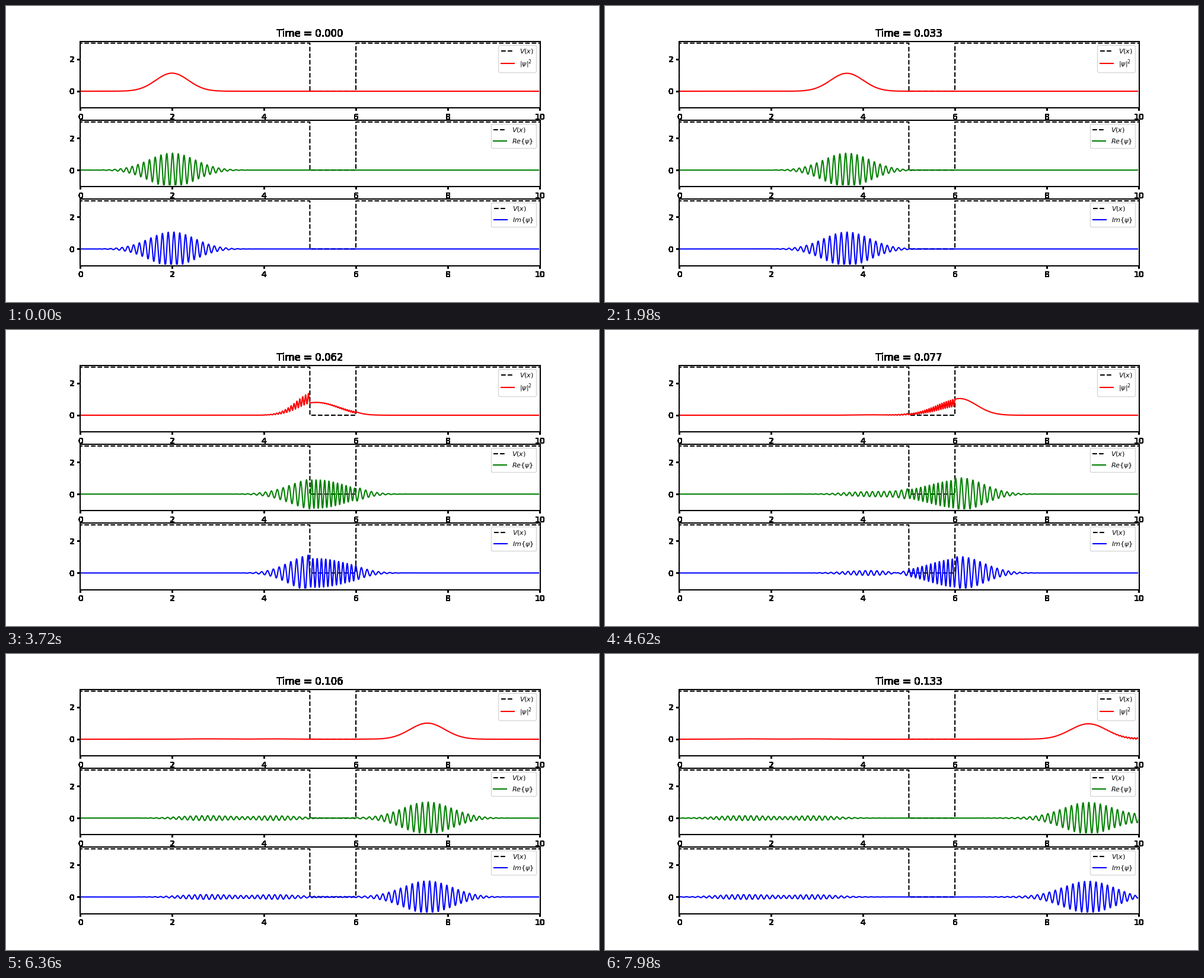
A matplotlib script for the animation above (8000 ms loop, 1000 by 500 pixels).

```python
import numpy as np
import matplotlib.pyplot as plt
from matplotlib.animation import FuncAnimation

# Wave packet meeting a finite square well inside a hard-walled box (hbar = m = 1)
LENGTH = 10.0
WELL = (5.0, 6.0)
V0 = 1000.0
X0, SIGMA, K0 = 2.0, 0.5, 50.0
MODES = 500
STEPS, DT = 134, 0.001
FRAMES, INTERVAL = 400, 20
FRAMES_PER_STEP = 3

x = np.linspace(0, LENGTH, 5001)


def solve():
    """Return psi with one column per time step, solved in the sine basis."""
    n = np.arange(1, MODES + 1)
    k = n * np.pi / LENGTH
    basis = np.sqrt(2 / LENGTH) * np.sin(np.outer(x, k))

    def cos_integral(d):
        a, b = (edge / LENGTH for edge in WELL)
        return b * np.sinc(d * b) - a * np.sinc(d * a)

    overlap = cos_integral(n[:, None] - n) - cos_integral(n[:, None] + n)
    energy, states = np.linalg.eigh(np.diag(k**2 / 2 + V0) - V0 * overlap)

    norm = (np.pi * SIGMA**2) ** -0.25
    psi0 = norm * np.exp(-((x - X0) ** 2) / (2 * SIGMA**2) + 1j * K0 * x)
    modes = basis @ states
    coeffs = modes.T @ psi0 * (x[1] - x[0])
    times = DT * np.arange(STEPS)
    return modes @ (coeffs[:, None] * np.exp(-1j * np.outer(energy, times)))


def harden(img, dpi):
    """Make every touched pixel solid black."""
    out = np.zeros_like(img)
    out[..., 3] = img[..., 3] > 0
    return out, 0, 0


def add_panel(ax, color, label):
    ax.set(xlim=(0, LENGTH), ylim=(-1, 3.1),
           xticks=range(0, 11, 2), yticks=(0, 2))
    a, b = WELL
    outside = (x > 0) & ((x < a) | (x > b))
    wall, = ax.plot(x, np.where(outside, 3, 0), "k--", label="$V(x)$")
    wave, = ax.plot([], [], color=color, label=label)
    legend = ax.legend(loc="upper right", fontsize=8)
    return wave, (wall, legend)


def freeze_backdrop():
    """Render the static parts once, with hard edges outside the panels."""
    fig.canvas.draw()
    backdrop = np.array(fig.canvas.buffer_rgba())
    backdrop[..., 3] = 255
    fig.figimage(backdrop, zorder=-1)
    fig.patch.set(facecolor="white", zorder=-2)
    for ax, (wave, static) in zip(axes, panels):
        ax.set_axis_off()
        for artist in static:
            artist.set_visible(False)
        wave.set_clip_box(ax.bbox.padded(-1))


psi = solve()
curves = (np.abs(psi) ** 2, psi.real, psi.imag)

plt.rcParams["font.family"] = "DejaVu Sans"
fig, axes = plt.subplots(
    3, 1, figsize=(10, 5), dpi=100, facecolor=(1, 1, 1, 0),
    gridspec_kw=dict(left=0.125, right=0.9, top=0.88, bottom=0.125, hspace=0.2))
styles = (("red", r"$|\psi|^2$"),
          ("green", r"$Re\{\psi\}$"),
          ("blue", r"$Im\{\psi\}$"))
panels = [add_panel(ax, *style) for ax, style in zip(axes, styles)]
freeze_backdrop()

title = axes[0].set_title("")
title.set_agg_filter(harden)


def update(frame):
    step = frame // FRAMES_PER_STEP
    title.set_text(f"Time = {step * DT:.3f}")
    for (wave, _), curve in zip(panels, curves):
        wave.set_data(x, curve[:, step])


anim = FuncAnimation(fig, update, frames=FRAMES, interval=INTERVAL,
                     repeat=True, repeat_delay=0)
plt.show()
```
